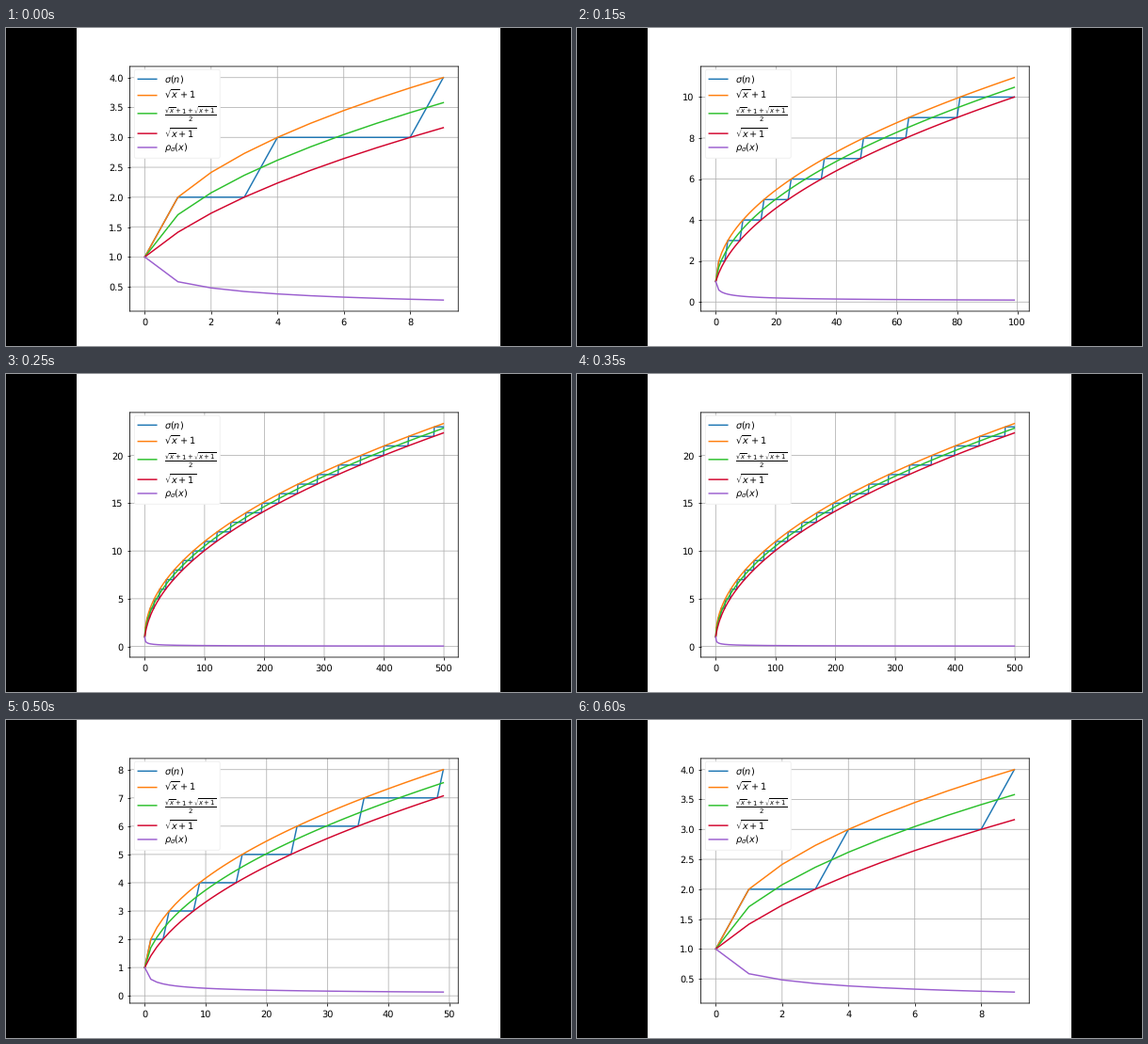
Write a matplotlib script that moves like this. It is 600 px wide and 338 px high and loops after 0.65 s.

```python
import numpy as np
import matplotlib.pyplot as plt
from matplotlib.animation import FuncAnimation
from matplotlib.patches import Rectangle

W, H = 600, 338
PANEL_X, PANEL_W = 75, 450
DPI = 100 * PANEL_W / 640
EPS = 1e-6  # keeps the pixel size from rounding down

plt.rcParams.update({
    "text.hinting": "none",
    "path.snap": False,
    "xtick.major.pad": 4.2,
    "legend.labelspacing": 0.32,
    "legend.framealpha": 1,
    "legend.edgecolor": "0.94",
})

RISE = [10, 20, 50, 100, 200, 500, 1000]
SIZES = RISE + RISE[-2::-1]

CURVES = [
    (r"$\sigma(n)$", "#1f77b4", lambda x: np.floor(np.sqrt(x)) + 1),
    (r"$\sqrt{x}+1$", "#ff7f0e", lambda x: np.sqrt(x) + 1),
    (r"$\frac{\sqrt{x}+1+\sqrt{x+1}}{2}$", "#2cc02c",
     lambda x: (np.sqrt(x) + 1 + np.sqrt(x + 1)) / 2),
    (r"$\sqrt{x+1}$", "#d2042d", lambda x: np.sqrt(x + 1)),
    (r"$\rho_\sigma(x)$", "#9b5fcf",
     lambda x: 1 - np.sqrt(x) / (1 + np.sqrt(x + 1))),
]

fig = plt.figure(figsize=((W + EPS) / DPI, (H + EPS) / DPI), dpi=DPI,
                 facecolor="black")
fig.add_artist(Rectangle((PANEL_X / W, 0), PANEL_W / W, 1,
                         facecolor="white", linewidth=0, zorder=-1))

left, right, top, bottom = 131.5, 480.25, 40.9, 301
ax = fig.add_axes([left / W, 1 - bottom / H,
                   (right - left) / W, (bottom - top) / H])


def draw(i):
    ax.clear()
    x = np.arange(SIZES[i])
    for label, color, f in CURVES:
        ax.plot(x, f(x), color=color, label=label)
    ax.grid(True)
    ax.legend(loc="upper left", bbox_to_anchor=(0, 1.006))


anim = FuncAnimation(fig, draw, frames=len(SIZES), init_func=lambda: None,
                     interval=50, repeat=True, repeat_delay=0)
plt.show()
```
